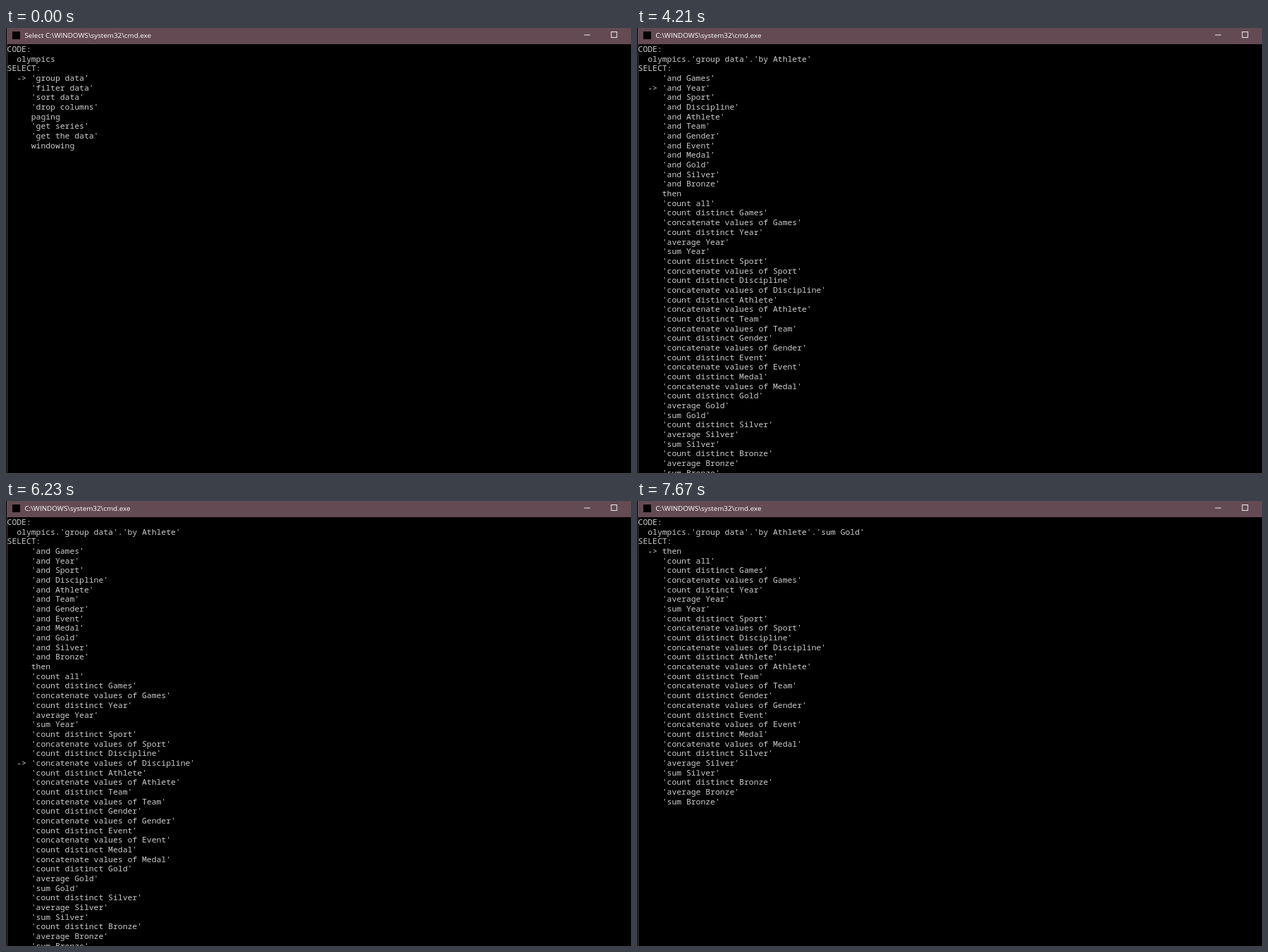
An HTML page with a canvas for the animation above (8000 ms loop, 887 by 632 pixels).

```html
<!DOCTYPE html>
<html lang="en">
<head>
<meta charset="utf-8">
<title>Console menu</title>
<style>
  html, body { margin: 0; width: 100%; height: 100%; overflow: hidden; background: #000; }
  canvas { display: block; }
</style>
</head>
<body>
<canvas id="stage" width="887" height="632"></canvas>
<script>
const ctx = document.getElementById('stage').getContext('2d');
const LOOP = 8000;
const ROW = 13.675;
const FIELDS = ['Games', 'Year', 'Sport', 'Discipline', 'Athlete', 'Team',
  'Gender', 'Event', 'Medal', 'Gold', 'Silver', 'Bronze'];
const NUMERIC = ['Year', 'Gold', 'Silver', 'Bronze'];

const quote = s => `'${s}'`;
const prefixed = word => FIELDS.map(f => quote(`${word} ${f}`));

function aggregates(fields) {
  const ops = f => NUMERIC.includes(f)
    ? ['count distinct', 'average', 'sum']
    : ['count distinct', 'concatenate values of'];
  return ['then', quote('count all'),
    ...fields.flatMap(f => ops(f).map(op => quote(`${op} ${f}`)))];
}

const ROOT = {
  code: 'olympics',
  items: ["'group data'", "'filter data'", "'sort data'", "'drop columns'",
    'paging', "'get series'", "'get the data'", 'windowing']
};
const GROUP = { code: "olympics.'group data'", items: prefixed('by') };
const AGGREGATE = {
  code: "olympics.'group data'.'by Athlete'",
  items: [...prefixed('and'), ...aggregates(FIELDS)]
};
const SUMMED = {
  code: "olympics.'group data'.'by Athlete'.'sum Gold'",
  items: aggregates(FIELDS.filter(f => f !== 'Gold'))
};

// Each event: [time, state changes]
const events = [];
const at = (time, change) => events.push([time, change]);
const clear = (...times) => times.forEach(t => at(t, { blank: true }));
const cursor = (on, ...times) => times.forEach(t => at(t, { cursor: on }));
const show = (time, menu, extra) =>
  at(time, { menu, arrow: 0, blank: false, cursor: false, ...extra });
const moveTo = (first, ...times) => times.forEach((t, i) =>
  at(t, { arrow: first + i, blank: false, limit: Infinity }));

show(0, ROOT, { select: true, limit: Infinity });
cursor(true, 260, 820, 1340);
cursor(false, 520, 1150, 1700);
at(1240, { select: false });

clear(1930);
show(1960, GROUP, { cursor: true });
cursor(false, 2260);
cursor(true, 2560);
clear(2890, 2990, 3090, 3190);
moveTo(1, 2920, 3020, 3120, 3220);

show(3520, AGGREGATE);
at(4180, { arrow: 1, limit: 25 });
moveTo(1, 4210);
clear(4440);
moveTo(15, 4700, 4900, 5010, 5130);
clear(5560);
moveTo(19, 5590);
clear(6050, 6460, 6700);
moveTo(20, 6080, 6150, 6230, 6330, 6400, 6490, 6560, 6630, 6760, 6850);
clear(7030, 7300);
moveTo(30, 6950, 7000, 7100, 7200, 7250, 7350);

clear(7610);
show(7670, SUMMED);
events.sort((a, b) => a[0] - b[0]);

function stateAt(time) {
  const state = {};
  for (const [t, change] of events) {
    if (t > time) break;
    Object.assign(state, change);
  }
  return state;
}

function rect(color, x, y, w, h) {
  ctx.fillStyle = color;
  ctx.fillRect(x, y, w, h);
}

function drawWindow(select) {
  rect('#000', 0, 0, 887, 632);
  rect('#644a52', 0, 0, 887, 23);
  rect('#4c4648', 1, 23, 1, 609);
  rect('#000', 0, 0, 1, 632);
  rect('#000', 9, 5, 11, 11);
  ctx.fillStyle = '#fff';
  ctx.font = '9.83px "Open Sans", "Noto Sans", sans-serif';
  ctx.fillText((select ? 'Select ' : '') + 'C:\\WINDOWS\\system32\\cmd.exe', 26.4, 13.5);
  rect('#fff', 820.4, 9.5, 8.6, 0.9);
  ctx.strokeStyle = '#fff';
  ctx.lineWidth = 0.9;
  ctx.strokeRect(859, 5.5, 7.9, 7.9);
}

function drawConsole({ menu, arrow, limit, cursor }) {
  const lines = ['CODE:', '  ' + menu.code, 'SELECT:',
    ...menu.items.slice(0, limit).map((item, i) => (i === arrow ? '  -> ' : '     ') + item)];
  ctx.fillStyle = '#ccc';
  ctx.font = '11.4px "Noto Sans Mono", "DejaVu Sans Mono", monospace';
  lines.forEach((line, row) => ctx.fillText(line, 1.6, Math.round(34 + row * ROW)));
  if (cursor) {
    const bottom = Math.round(23.5 + (lines.length + 1) * ROW);
    rect('#fff', 1.7, bottom - 4, 6.9, 4);
  }
}

function draw() {
  const state = stateAt(performance.now() % LOOP);
  drawWindow(state.select);
  if (!state.blank) drawConsole(state);
  requestAnimationFrame(draw);
}
draw();
</script>
</body>
</html>
```
